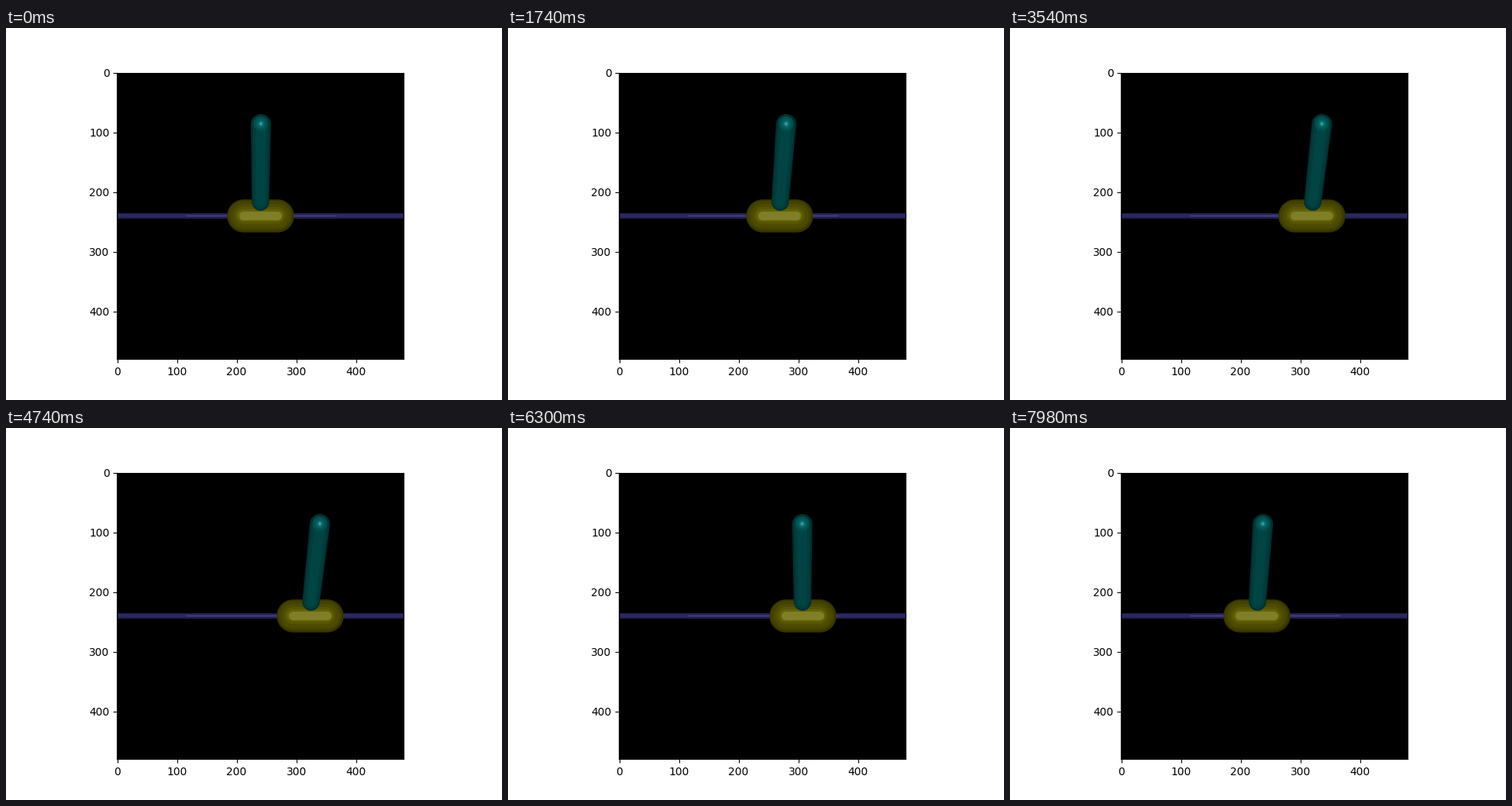
Recreate the animation shown at these times as a matplotlib script. Size 640x480 px, loop 8000 ms.

```python
import numpy as np
import matplotlib.pyplot as plt
from matplotlib.animation import FuncAnimation
from matplotlib.lines import Line2D
from matplotlib.patches import Polygon
from matplotlib.transforms import Affine2D

W, H, DPI = 640, 480, 100
TICK, HOLD, LOOP = 20, 3, 8000  # ms per frame, frames per pose, ms per loop

RAIL_Y, CART_Y, CART_HALF = 242, 242.2, 22
TIP_Y, BASE_Y, TIP_R, BASE_R = 124, 224.6, 13, 11.2

# radius and colour, outermost first
CART = [(21.3, "#363500"), (19, "#434200"), (15.5, "#4c4b00"),
        (11, "#575600"), (8, "#636209"), (5.5, "#807e27")]
# share of the radius and colour
POLE = [(1, "#00302f"), (0.82, "#003d3c"), (0.5, "#004544")]
GLOW = [(9, "#005150"), (6, "#00605f"), (3.6, "#12716f"), (1.6, "#459c99")]

# positions over time: cart centre and pole tip, in pixels
CART_T = [0, 350, 840, 1740, 2520, 3360, 3540, 4200, 4740,
          5040, 5340, 5580, 5960, 6720, 6900, 7560, 7980]
CART_X = [328.3, 324.3, 332.4, 350, 366.5, 386.2, 388.8, 397.5, 391.8,
          384, 373.4, 377.9, 384.6, 365, 357.1, 329, 318.3]
TIP_T = [0, 1740, 3540, 4740, 5580, 6900, 7980]
TIP_X = [328.9, 358.9, 402.4, 405, 392.7, 364.9, 326.3]


def smooth(t, times, values):
    """Cubic Hermite curve through the given points."""
    slopes = np.gradient(values, times)
    i = min(np.searchsorted(times, t, side="right") - 1, len(times) - 2)
    span = times[i + 1] - times[i]
    u = (t - times[i]) / span
    return ((1 + 2 * u) * (1 - u) ** 2 * values[i]
            + u * (1 - u) ** 2 * span * slopes[i]
            + u * u * (3 - 2 * u) * values[i + 1]
            + u * u * (u - 1) * span * slopes[i + 1])


def capsule(x0, y0, r0, x1, y1, r1):
    """Outline of a tapered capsule between two round ends."""
    a = np.arctan2(y1 - y0, x1 - x0)
    half = np.linspace(np.pi / 2, 3 * np.pi / 2, 20)
    first = np.column_stack([x0 + r0 * np.cos(a + half),
                             y0 + r0 * np.sin(a + half)])
    last = np.column_stack([x1 - r1 * np.cos(a + half),
                            y1 - r1 * np.sin(a + half)])
    return np.vstack([first, last])


fig = plt.figure(figsize=(W / DPI, H / DPI), dpi=DPI, facecolor="white")
ax = fig.add_subplot(facecolor="black")
ax.set(xlim=(-0.5, 479.5), ylim=(479.5, -0.5), aspect="equal",
       xticks=range(0, 500, 100), yticks=range(0, 500, 100))
screen = Affine2D().scale(1, -1).translate(0, H)


def place(artist):
    artist.set_transform(screen)
    artist.set_zorder(2)
    ax.add_artist(artist)
    artist.set_clip_path(ax.patch)
    return artist


def bar(x0, x1, y, width, color, cap="butt"):
    return place(Line2D([x0, x1], [y, y], color=color, lw=width * 72 / DPI,
                        solid_capstyle=cap))


def shape(color):
    return place(Polygon(np.zeros((3, 2)), fc=color, ec="none"))


bar(143, 514, RAIL_Y, 7, "#211f4b")
bar(143, 514, RAIL_Y, 4, "#2b2862")
bar(232, 426, RAIL_Y, 1.3, "#48448f")
cart = [bar(0, 1, CART_Y, 2 * r, c, "round") for r, c in CART]
pole = [shape(c) for _, c in POLE]
glow = [shape(c) for _, c in GLOW]


def draw(n):
    t = n // HOLD * HOLD * TICK
    x = smooth(t, CART_T, CART_X)
    tip = smooth(t, TIP_T, TIP_X)
    base = x + 0.13 * (tip - x)
    for line in cart:
        line.set_xdata([x - CART_HALF, x + CART_HALF])
    for part, (k, _) in zip(pole, POLE):
        part.set_xy(capsule(tip, TIP_Y, k * TIP_R, base, BASE_Y, k * BASE_R))
    for part, (r, _) in zip(glow, GLOW):
        part.set_xy(capsule(tip, TIP_Y - 0.8, r, tip, TIP_Y - 0.2, r))
    return cart + pole + glow


anim = FuncAnimation(fig, draw, frames=LOOP // TICK, interval=TICK,
                     repeat=True, repeat_delay=0)
plt.show()
```
